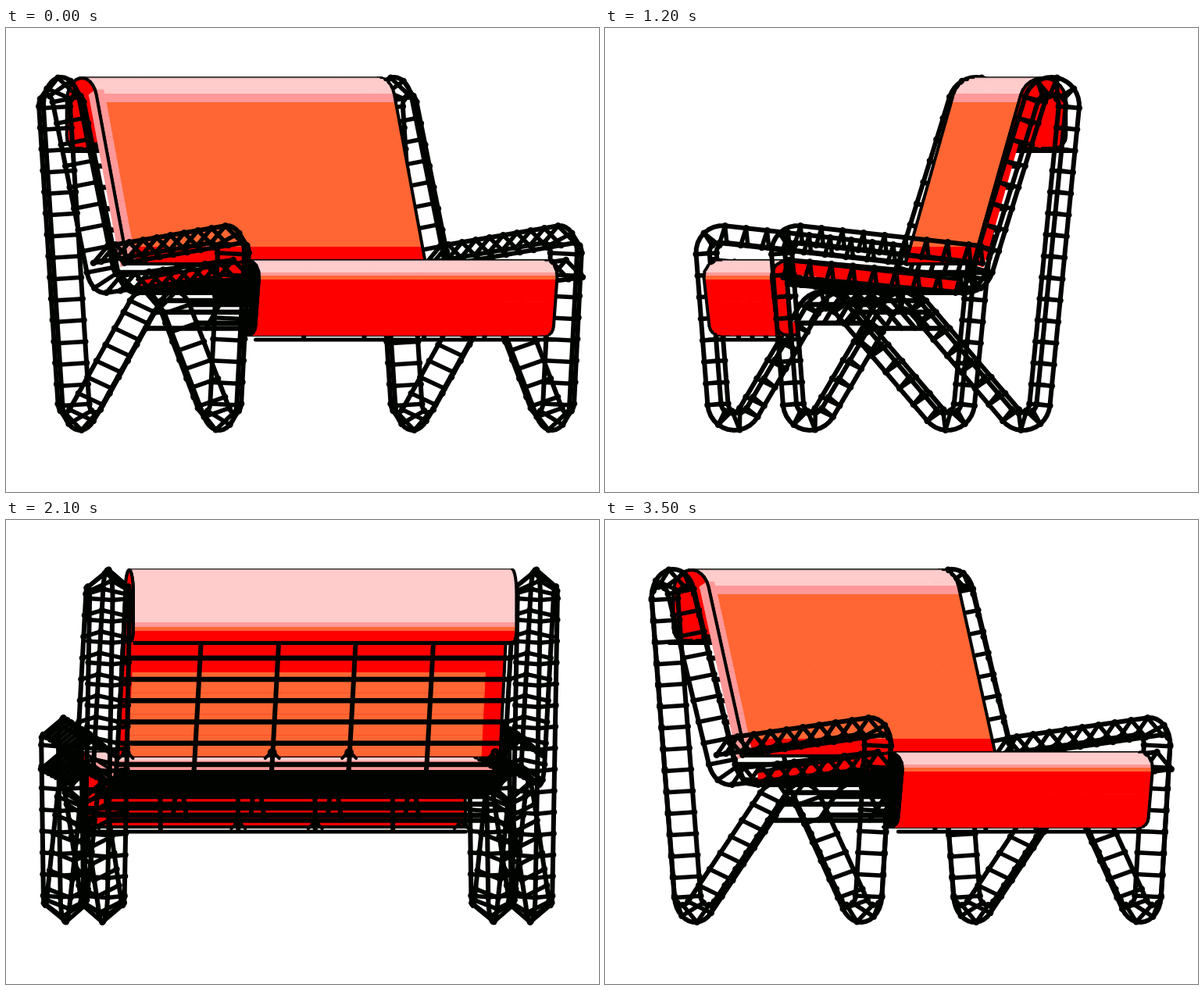
An HTML page with a canvas for the animation above (3.6 s loop, 759 by 594 pixels).

```html
<!DOCTYPE html>
<html lang="en">
<head>
<meta charset="utf-8">
<title>Turning bench</title>
<style>
html, body { margin: 0; width: 100%; height: 100%; overflow: hidden; background: #fff; }
canvas { display: block; }
</style>
</head>
<body>
<canvas id="stage" width="759" height="594"></canvas>
<script>
const ctx = document.getElementById('stage').getContext('2d');
const PALE = '#ffcccc', PINK = '#ff9999', ORANGE = '#ff6633', RED = '#ff0000', BLACK = '#000300';
const CENTER = 378.5, HALF = 249, FRAME_W = 278, TRUSS = 26, STEP = 27.5;
ctx.lineJoin = ctx.lineCap = 'round';

// Runs a belt around circles [depth, y, signed radius]; o is the outer edge, i the inner one.
function belt(circles, thick) {
  const pts = [];
  const add = (x, y, r, a, rung, seg) => {
    const nx = Math.cos(a), ny = Math.sin(a), q = r - thick;
    pts.push({ o: [x + r * nx, y + r * ny], i: [x + q * nx, y + q * ny], nx, rung, seg });
  };
  const normals = circles.slice(1).map(([x2, y2, r2], k) => {
    const [x1, y1, r1] = circles[k], dx = x2 - x1, dy = y2 - y1;
    return Math.atan2(dy, dx) - Math.acos((r1 - r2) / Math.hypot(dx, dy));
  });
  const last = circles.length - 1;
  circles.forEach(([x, y, r], k) => {
    if (k === 0) add(x, y, r, normals[0], true, 0);
    else if (k === last) add(x, y, r, normals[k - 1], true, 2 * k);
    else {
      const turn = 2 * Math.PI, from = normals[k - 1];
      let sweep = ((normals[k] - from) % turn + turn) % turn;
      if (r < 0) sweep -= turn;
      const reach = Math.max(Math.abs(r), Math.abs(r - thick));
      const n = Math.max(1, Math.round(reach * Math.abs(sweep) / STEP));
      for (let j = 0; j <= n * 4; j++) add(x, y, r, from + sweep * j / (n * 4), j % 4 === 0, 2 * k);
    }
    if (k === last) return;
    // Rungs keep their pitch from the far end; a small remainder is spread out.
    const [x2, y2, r2] = circles[k + 1];
    const len = Math.sqrt((x2 - x) ** 2 + (y2 - y) ** 2 - (r2 - r) ** 2);
    const whole = Math.max(1, Math.floor(len / STEP));
    const gap = len / STEP - whole < 0.45 ? len / whole : STEP;
    for (let j = Math.ceil(len / gap - 0.01) - 1; j > 0; j--) {
      const f = 1 - j * gap / len;
      add(x + (x2 - x) * f, y + (y2 - y) * f, r + (r2 - r) * f, normals[k], true, 2 * k + 1);
    }
  });
  return pts;
}

const frame = belt([
  [-55, 279, 0], [183, 287, 34], [167, 480, 35], [47, 372, -13],
  [-110, 480, 35], [-147, 99, 36], [-30, 302, -15], [195, 297, 0]
], 22);
const back = belt([[-140, 154, 0], [-155, 138, 16], [-141, 94, 30], [-50, 302, 0]], 14);
const seat = belt([[-30, 322, 0], [192, 318, 20], [192, 380, 13], [180, 393, 0]], 16);

// Hard-edged vertical shading: colour, lower limit, colour, lower limit, ..., colour
function bands(...list) {
  const g = ctx.createLinearGradient(0, 0, 0, 594);
  let top = 0;
  for (let k = 0; k < list.length; k += 2) {
    const end = (list[k + 1] ?? 594) / 594;
    g.addColorStop(top, list[k]);
    g.addColorStop(end, list[k]);
    top = end;
  }
  return g;
}
const backFront = bands(PALE, 84, PINK, 95, ORANGE, 280, RED);
const rollRear = bands(PALE, 131, PINK, 137, ORANGE, 142, RED);
const backInside = bands(RED, 195, ORANGE);
const seatFront = bands(PALE, 313, PINK, 317, ORANGE, 322, RED);
const seatRear = bands(PALE, 308, PINK, 330, RED);

let cos, sin;
const px = (w, d) => CENTER + w * cos + d * sin;

function trace(pts, close) {
  ctx.beginPath();
  for (const [w, d, y] of pts) ctx.lineTo(px(w, d), y);
  if (close) ctx.closePath();
}
function stroke(pts, width) {
  trace(pts);
  ctx.strokeStyle = BLACK;
  ctx.lineWidth = width;
  ctx.stroke();
}
function fill(pts, color) {
  trace(pts, true);
  ctx.fillStyle = ctx.strokeStyle = color;
  ctx.lineWidth = 1;
  ctx.fill();
  ctx.stroke();
}
const bar = (d, y, width) => stroke([[-HALF, d, y], [HALF, d, y]], width);
const quad = (a, b, w1, w2, color) =>
  fill([[w1, ...a.o], [w2, ...a.o], [w2, ...b.o], [w1, ...b.o]], color);

function drawFrame(w) {
  stroke(frame.map(p => [w, ...p.o]), 6);
  for (const side of [-TRUSS, TRUSS]) stroke(frame.map(p => [w + side, ...p.i]), 6);
  ctx.fillStyle = BLACK;
  for (const p of frame) {
    if (!p.rung) continue;
    const rung = [[w - TRUSS, ...p.i], [w, ...p.o], [w + TRUSS, ...p.i]];
    stroke(rung, 5.5);
    for (const [cw, d, y] of rung) {
      ctx.beginPath();
      ctx.arc(px(cw, d), y, 4.2, 0, 7);
      ctx.fill();
    }
  }
}

function knot(w, d, y) {
  const x = px(w, d);
  ctx.lineWidth = 4;
  ctx.strokeStyle = BLACK;
  ctx.beginPath();
  ctx.arc(x, y - 2, 4, 0, 7);
  ctx.moveTo(x - 9, y + 5);
  ctx.lineTo(x, y - 4);
  ctx.lineTo(x + 9, y + 5);
  ctx.stroke();
}

function backStrip(a, b) {
  const outer = (a.nx + b.nx) * cos > 0;
  if (cos > 0) {
    quad(a, b, -HALF, HALF, outer ? backFront : RED);
    if (outer && sin > 0 && a.o[1] > 75) quad(a, b, -HALF, -HALF + 14, PINK);
  } else if (outer) {
    quad(a, b, -HALF, HALF, rollRear);
  } else {
    quad(a, b, -HALF, HALF, RED);
    quad(a, b, -224, 234, backInside);
  }
}
function seatStrip(a, b) {
  const outer = (a.nx + b.nx) * cos > 0;
  quad(a, b, -HALF, HALF, !outer ? RED : cos > 0 ? seatFront : seatRear);
}

// Everything between the two side frames, as [depth, draw]
const parts = [];
const put = (d, draw) => parts.push([d, draw]);
const wires = [-151, -50, 50, 151];

for (const [sheet, strip] of [[back, backStrip], [seat, seatStrip]]) {
  sheet.slice(1).forEach((b, k) => {
    const a = sheet[k];
    put((a.o[0] + b.o[0]) / 2, () => {
      strip(a, b);
      for (const w of [-HALF, HALF]) stroke([[w, ...a.o], [w, ...b.o]], 4);
    });
  });
  const top = sheet.reduce((m, p) => p.o[1] < m.o[1] ? p : m);
  for (const p of [sheet[0], top, sheet[sheet.length - 1]]) put(p.o[0], () => bar(...p.o, 4));
}

const inGrid = p => p.seg > 10 || (p.seg > 4 && p.seg < 8 && p.i[1] < 396);
frame.forEach((p, k) => {
  if (!inGrid(p)) return;
  if (p.rung) put(p.i[0], () => bar(...p.i, 6.5));
  const next = frame[k + 1];
  if (next && inGrid(next)) put((p.i[0] + next.i[0]) / 2, () => {
    for (const w of wires) stroke([[w, ...p.i], [w, ...next.i]], 6);
  });
});
put(186, () => {
  for (const w of wires) stroke([[w, 190, 305], [w, 184, 396]], 6);
  for (const y of [345, 369]) bar(187, y, 6);
});
put(-178, () => bar(-178, 158, 4));
put(205, () => bar(205, 399, 5));
for (const [d, y] of [[-66, 300], [184, 390]]) {
  put(d, () => { if (cos < 0) for (const w of [-240, -50, 50, 240]) knot(w, d, y); });
}

function drawCaps(side) {
  const w = side * HALF;
  const cap = (pts, color) =>
    fill([...pts.map(p => [w, ...p.o]), ...pts.map(p => [w, ...p.i]).reverse()], color);
  fill(back.filter(p => p.o[1] < 156).map(p => [w, ...p.o]), RED);
  cap(back.filter(p => p.nx > 0 && p.o[1] > 75), sin > 0 && cos > 0 ? PINK : RED);
  cap(seat.filter(p => p.seg < 3), cos < -0.3 ? seatRear : RED);
  cap(seat.filter(p => p.seg > 1), cos > 0.3 ? BLACK : RED);
  stroke(back.map(p => [w, ...p.o]), 4);
  stroke(seat.map(p => [w, ...p.o]), 4);
}

function draw(now) {
  const step = Math.floor(now / 100) % 36;
  const angle = (40 - 10 * step) * Math.PI / 180;
  cos = Math.cos(angle);
  sin = Math.sin(angle);
  ctx.fillStyle = '#fff';
  ctx.fillRect(0, 0, 759, 594);
  const near = sin > 0 ? -1 : 1, facing = cos > 0 ? 1 : -1;
  drawFrame(-near * FRAME_W);
  parts.sort((a, b) => (a[0] - b[0]) * facing);
  for (const [, paint] of parts) paint();
  if (Math.abs(sin) > 0.01) drawCaps(near);
  drawFrame(near * FRAME_W);
}

function tick() {
  draw(performance.now());
  requestAnimationFrame(tick);
}
tick();
</script>
</body>
</html>
```
